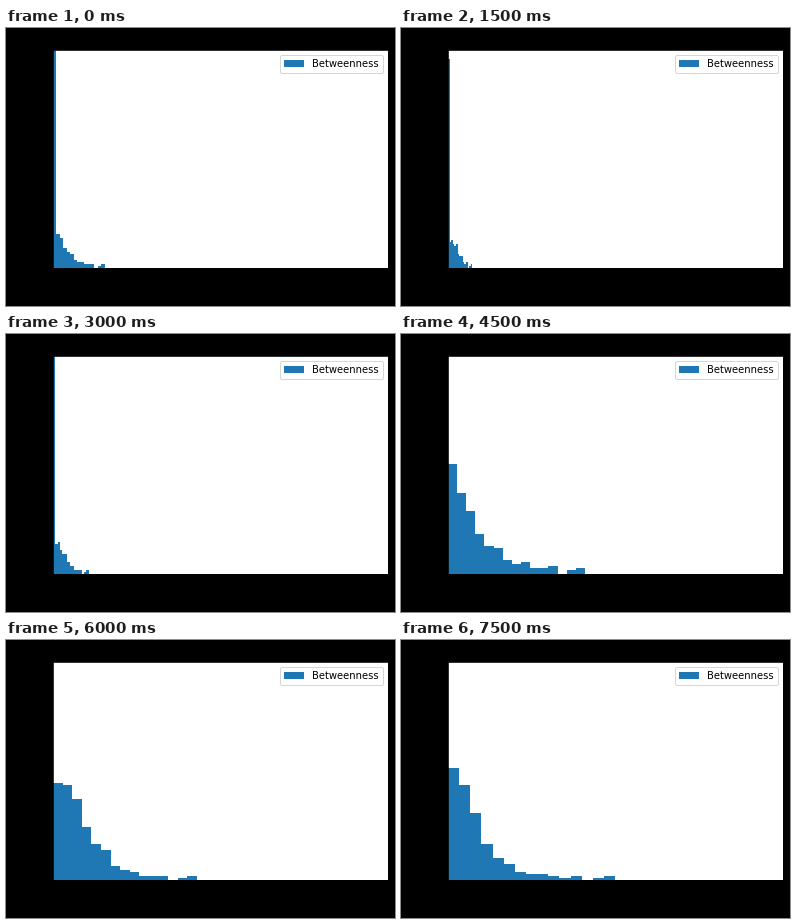
A matplotlib script for the animation above (8000 ms loop, 389x278 px).

```python
import matplotlib.pyplot as plt
import numpy as np
from matplotlib.animation import FuncAnimation

W, H, DPI = 389, 278, 72
STEP = 500            # ms per animation frame
HOLD = 3              # animation frames per histogram
BINS = 15
EMPTY_BIN = 12        # the gap every sparse tail has
TAIL = 1.5            # mean count far from the peak
Y_MAX = 110.4

# Axes box in pixels, measured from the lower left corner
LEFT, BOTTOM, AX_W, AX_H = 46.95, 38.16, 334.8, 217.44

# bin width in pixels, first count, then peak, scale and power of the decay
SHAPES = [
    (3.46, 119, 18, 4.0, 1.5),
    (1.63, 106, 11.5, 7.5, 3.0),
    (2.38, 111, 14.5, 5.8, 2.2),
    (9.13, 56, 58, 2.8, 1.0),
    (9.60, 49, 53, 3.8, 1.6),
    (11.15, 57, 64, 2.5, 1.3),
]


def bin_counts(first, peak, scale, power):
    """Stretched exponential decay with a ripple that grows along the tail."""
    i = np.arange(BINS)
    decay = peak * np.exp(-(i / scale) ** power) + TAIL
    ripple = 1 + i / 28 * np.cos(2 * np.pi * (i - 2) / 3)
    counts = np.round(decay * ripple)
    counts[0] = first
    counts[EMPTY_BIN] = 0
    return counts


fig = plt.figure(figsize=(W / DPI, H / DPI), dpi=DPI, facecolor="black")
ax = fig.add_axes([LEFT / W, BOTTOM / H, AX_W / W, AX_H / H])

bars = ax.bar(range(BINS), [0] * BINS, width=1, align="edge",
              color="#1f77b4", label="Betweenness")
ax.set(xlim=(0, AX_W), ylim=(0, Y_MAX), xticks=[], yticks=[])
ax.legend(loc="upper right", prop={"family": "DejaVu Sans", "size": 10})


def update(frame):
    width, *shape = SHAPES[frame // HOLD]
    for i, (bar, count) in enumerate(zip(bars, bin_counts(*shape))):
        bar.set(x=i * width, width=width, height=count)
    return list(bars)


anim = FuncAnimation(fig, update, frames=8000 // STEP, interval=STEP,
                     repeat=True, repeat_delay=0, blit=False)
plt.show()
```
